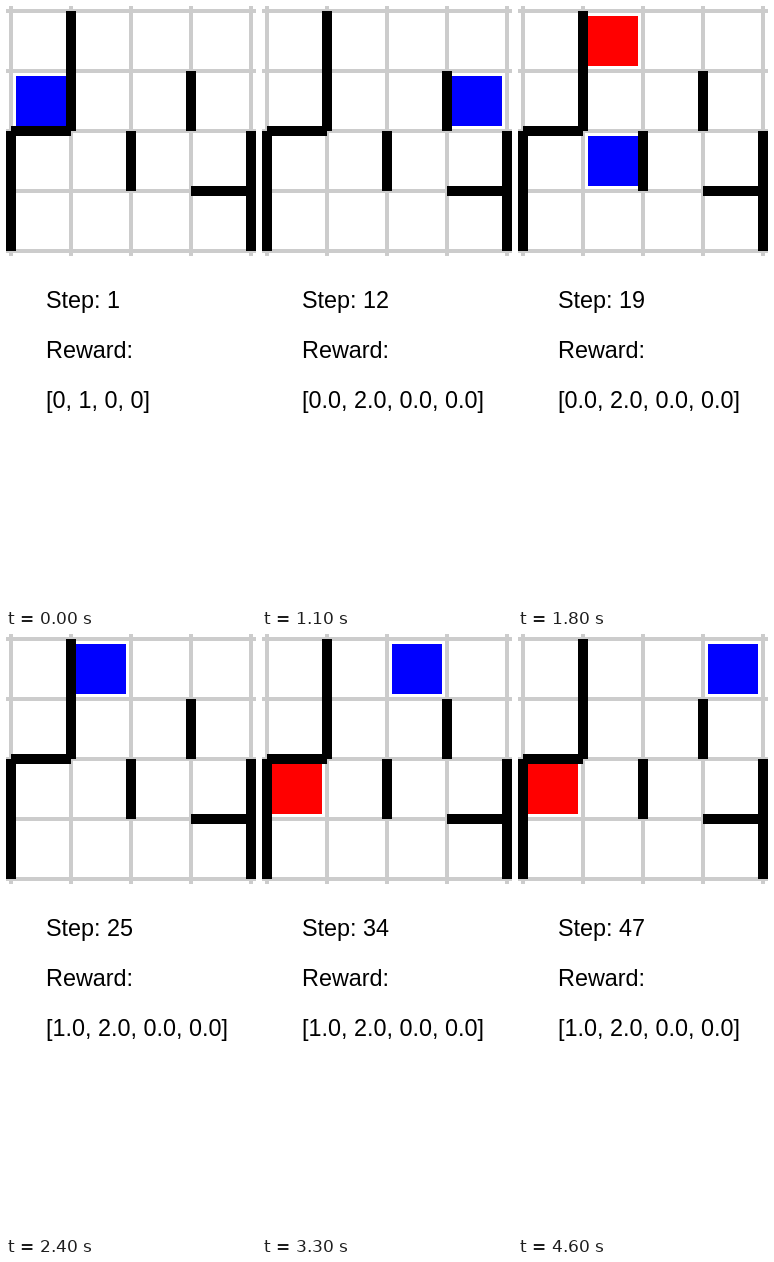
Write an HTML page that moves like this. It is 250x600 px and loops after 4.7 s.

```html
<!DOCTYPE html>
<html lang="en">
<head>
<meta charset="utf-8">
<title>Grid walk</title>
<style>
  html, body { margin: 0; width: 100%; height: 100%; overflow: hidden; background: #fff; }
  svg { display: block; }
  text { font-family: "Liberation Sans", Arial, sans-serif; font-size: 23.4px; white-space: pre; }
</style>
</head>
<body>
<svg width="250" height="600" viewBox="0 0 250 600">
  <path id="grid" fill="none" stroke="#ccc" stroke-width="4"/>
  <rect id="goal" width="50" height="50" fill="#f00"/>
  <rect id="agent" width="50" height="50" fill="#00f"/>
  <path fill="none" stroke="#000" stroke-width="10"
    d="M65 5V125M5 125H65M5 125V245M125 125V185M185 65V125M185 185H245M245 125V245"/>
  <text id="step" x="40" y="302"></text>
  <text x="40" y="352">Reward:</text>
  <text id="reward" x="40" y="402"></text>
</svg>
<script>
const STEP_MS = 100, CELL = 60, SIZE = 4;
const MOVES = { U: [0, -1], D: [0, 1], L: [-1, 0], R: [1, 0], S: [0, 0] };
const WALK = "ULLRDURDULD" + "URUUDRU" + "DRUUUL" + "RRDDUUDUL" + "RDSUD" + "ULRDSULR";

// Each entry holds from its step until the next one.
const REWARDS = [
  [1, "[0, 1, 0, 0]"],
  [5, "[0.0, 1.0, 0, 0]"],
  [9, "[0.0, 2.0, 0.0, 0.0]"],
  [25, "[1.0, 2.0, 0.0, 0.0]"]
];
const GOALS = [[1, null], [15, [1, 0]], [25, null], [28, [0, 2]]];

const $ = id => document.getElementById(id);
const wrap = n => (n + SIZE) % SIZE;
const valueAt = (list, step) => list.filter(([from]) => from <= step).pop()[1];

// The board joins up at its open edges.
const path = [[0, 1]];
for (const move of WALK) {
  const [x, y] = path[path.length - 1];
  const [dx, dy] = MOVES[move];
  path.push([wrap(x + dx), wrap(y + dy)]);
}

let lines = "";
for (let i = 0; i <= SIZE; i++) {
  const p = 5 + i * CELL;
  lines += `M${p} 0V250M0 ${p}H250`;
}
$("grid").setAttribute("d", lines);

function place(square, cell) {
  square.style.display = cell ? "" : "none";
  if (!cell) return;
  square.setAttribute("x", 10 + cell[0] * CELL);
  square.setAttribute("y", 10 + cell[1] * CELL);
}

function draw(time) {
  const index = Math.floor(time / STEP_MS) % path.length;
  const step = index + 1;
  place($("agent"), path[index]);
  place($("goal"), valueAt(GOALS, step));
  $("step").textContent = "Step: " + step;
  $("reward").textContent = valueAt(REWARDS, step);
}

const start = performance.now();
function tick() {
  draw(performance.now() - start);
  requestAnimationFrame(tick);
}
tick();
</script>
</body>
</html>
```
